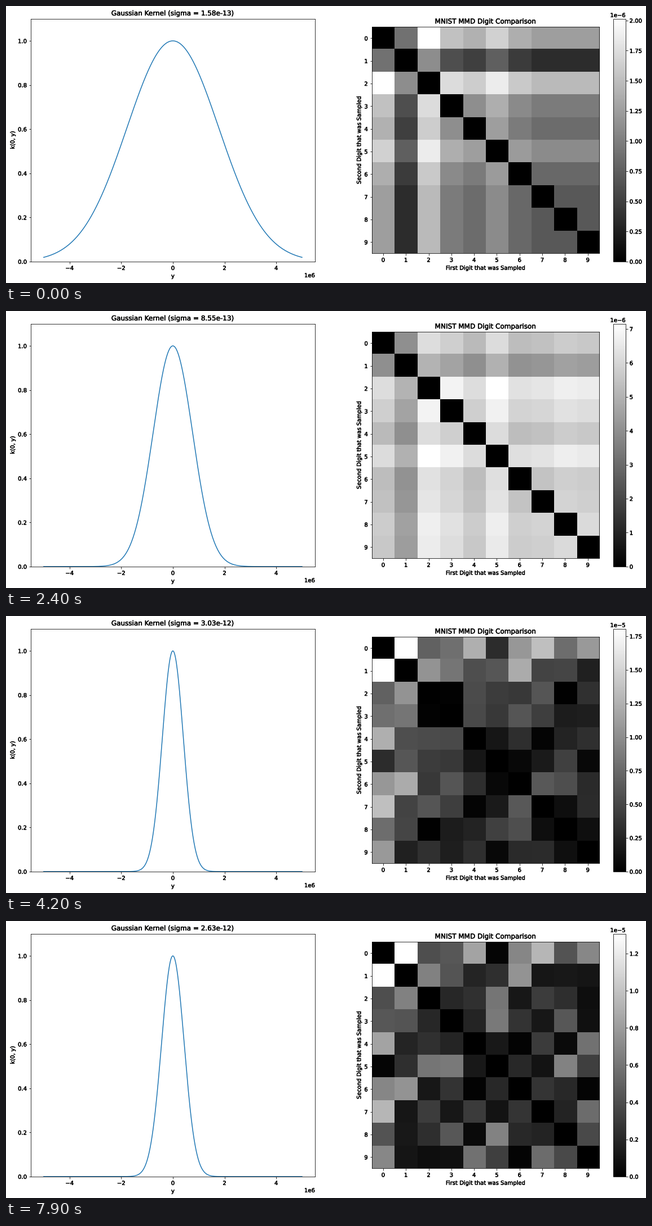
A matplotlib script that plays this animation: 1135x493 px, repeating every 8000 ms.

```python
import numpy as np
import matplotlib.pyplot as plt
from matplotlib.animation import FuncAnimation
from matplotlib.patheffects import withStroke
from matplotlib.text import Text

W, H, DPI = 1135, 493, 72
plt.rcParams.update({"font.family": "DejaVu Sans", "font.size": 10})

# Kernel widths sweep up on a log scale, then back down.
STEPS = 60
SIGMAS = np.logspace(-12.8, -11, STEPS)
FRAMES = 80
HEAVY = [withStroke(linewidth=0.5, foreground="black")]

# Each digit has a level (in 1e-6) that rises, then falls through zero.
wide = np.array([0.9, 0, 1.114, 0.62, 0.5, 0.75, 0.47, 0.35, 0.35, 0.35])
medium = np.array([2.6, 1.4, 3.6, 3.2, 2.6, 3.55, 2.7, 2.8, 3.1, 3])
crossing = np.array([-5.1, -2.4, 0.3, 1.1, 1.6, 4.1, -0.2, 1.1, 2.6, 3.4])
narrow = np.array([-24.4, -23.8, -9, -11.5, -11, -4.5, -15.5, -12.5, -9, -8])

KEY_STEPS = [0, 15, 24, 37, 55, 59]
LEVELS = [wide, 0.49 * wide + 0.51 * medium, medium, crossing, narrow, 1.06 * narrow]

# Digits of similar shape have close angles; narrow kernels feel this more.
ANGLES = np.radians([0, -150, -10, -50, 150, -20, 70, -170, -80, 180])
LIKENESS = np.cos(np.subtract.outer(ANGLES, ANGLES))
COUPLING = [0, 0, 0, 2.7, 6, 6.4]


def mmd(step):
    """Discrepancy of every digit pair at one step of the sweep."""
    k = min(np.searchsorted(KEY_STEPS, step, side="right"), len(KEY_STEPS) - 1)
    u = (step - KEY_STEPS[k - 1]) / (KEY_STEPS[k] - KEY_STEPS[k - 1])
    ease = u * u * (3 - 2 * u)

    def blend(keys):
        return keys[k - 1] + ease * (keys[k] - keys[k - 1])

    level = blend(LEVELS)
    m = np.add.outer(level, level) + blend(COUPLING) * LIKENESS
    np.fill_diagonal(m, 0)
    return np.abs(m) * 1e-6


def add_axes(x, y, width, height):
    """Axes from a pixel box measured from the top left."""
    return fig.add_axes([x / W, 1 - (y + height) / H, width / W, height / H])


fig = plt.figure(figsize=(W / DPI, H / DPI), dpi=DPI, facecolor="white")

# Two equal panels; the second is shared by the heat map and its colour bar.
LEFT, TOP, PANEL_W, PANEL_H = 43.9, 22.8, 504, 432
SECOND = LEFT + 1.2 * PANEL_W
SIDE = 0.8 * PANEL_W

kernel_ax = add_axes(LEFT, TOP, PANEL_W, PANEL_H)
y = np.linspace(-5e6, 5e6, 501)
curve, = kernel_ax.plot(y, np.zeros_like(y), color="#1f77b4", lw=1.5)
kernel_ax.set(xlim=(-5.5e6, 5.5e6), ylim=(0, 1.1), xlabel="y", ylabel="k(0, y)")
kernel_ax.set_xticks(np.arange(-4e6, 5e6, 2e6))
kernel_title = kernel_ax.set_title("")

digit_ax = add_axes(SECOND, TOP + (PANEL_H - SIDE) / 2, SIDE, SIDE)
image = digit_ax.imshow(mmd(0), cmap="gray", interpolation="nearest", aspect="auto")
digit_ax.set(xticks=range(10), yticks=range(10),
             xlabel="First Digit that was Sampled",
             ylabel="Second Digit that was Sampled",
             title="MNIST MMD Digit Comparison")
bar_ax = add_axes(SECOND + 0.85 * PANEL_W, TOP, PANEL_H / 20, PANEL_H)
fig.colorbar(image, cax=bar_ax)


def update(frame):
    step = frame if frame < STEPS else 2 * STEPS - 1 - frame
    sigma = SIGMAS[step]
    curve.set_ydata(np.exp(-sigma * y ** 2))
    kernel_title.set_text(f"Gaussian Kernel (sigma = {sigma:.2e})")
    values = mmd(step)
    image.set_data(values)
    image.set_clim(0, values.max())
    bar_ax.get_yticklabels()  # creates any new tick labels before styling
    for text in fig.findobj(Text):
        text.set_path_effects(HEAVY)
    return curve, kernel_title, image


anim = FuncAnimation(fig, update, frames=FRAMES, interval=100, repeat=True,
                     repeat_delay=0, blit=False)
plt.show()
```
